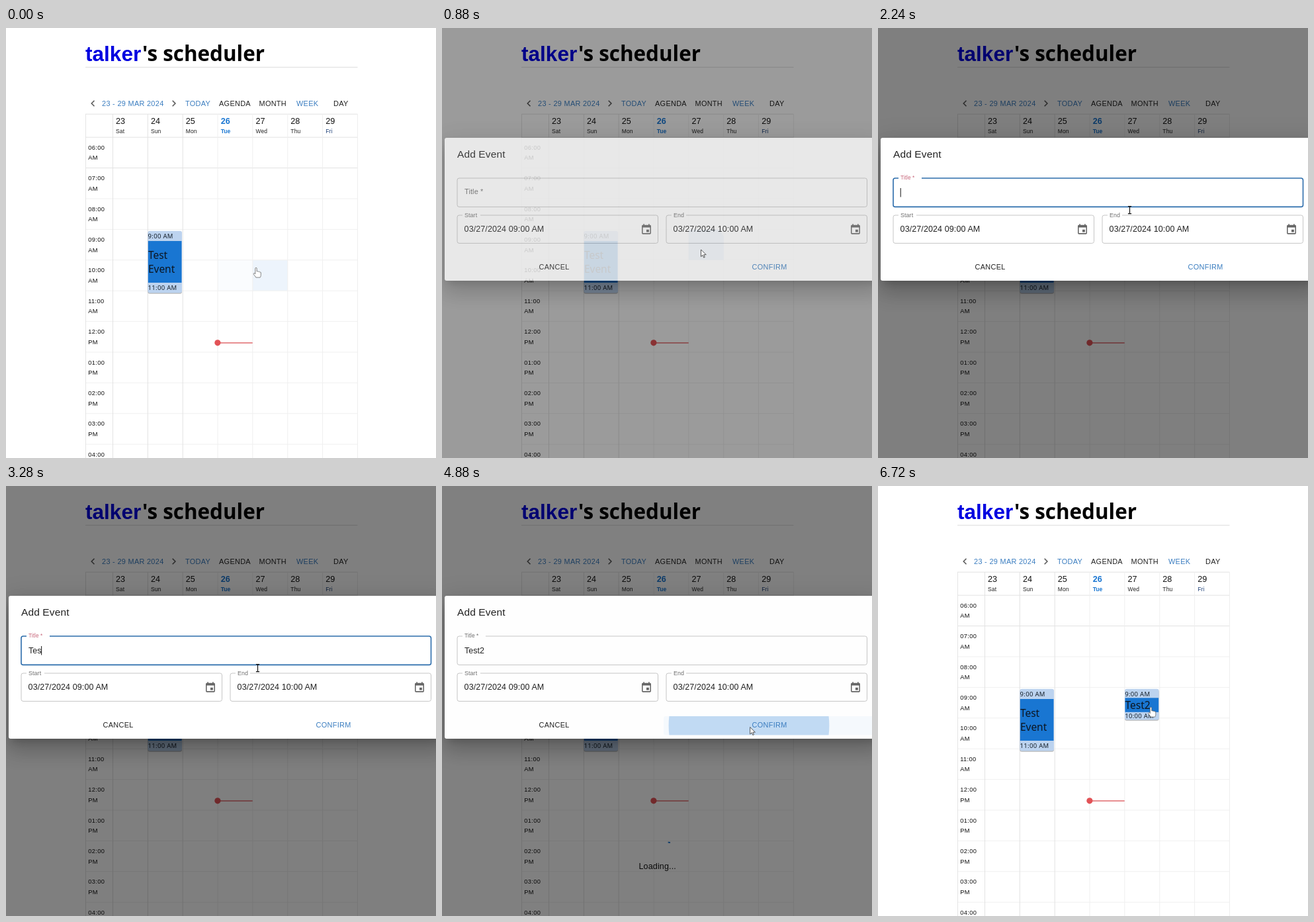
Write an HTML page that moves like this. It is 650x650 px and loops after 6800 ms.

```html
<!DOCTYPE html>
<html lang="en">
<head>
<meta charset="utf-8">
<title>Scheduler</title>
<style>
html, body { margin: 0; width: 100%; height: 100%; overflow: hidden; background: #fff; }
#stage { position: relative; width: 650px; height: 650px; overflow: hidden; }
#stage > *, #dialog > svg { position: absolute; left: 0; top: 0; }
svg { display: block; width: 650px; height: 650px; }
text { font-family: "Liberation Sans", Arial, sans-serif; white-space: pre; }
.noto { font-family: "Noto Sans", "Open Sans", sans-serif; }
#shade { width: 650px; height: 650px; background: rgba(0, 0, 0, .5); }
#dialog { width: 650px; height: 650px; }
#paper {
  position: absolute; left: 4px; top: 166px; width: 660px; height: 216px;
  border-radius: 3px; background: #fff;
  box-shadow: 0 8.5px 11.6px -5.4px rgba(0, 0, 0, .2),
    0 18.6px 29.5px 2.3px rgba(0, 0, 0, .14), 0 7px 35.7px 6.2px rgba(0, 0, 0, .12);
}
</style>
</head>
<body>
<div id="stage">
  <svg id="calendar"></svg>
  <div id="shade"></div>
  <div id="dialog"><div id="paper"></div><svg id="form"></svg></div>
  <svg id="pointer"></svg>
</div>
<script>
const LOOP = 6800, STEP = 80;
const BLUE = '#1976d2', LINK = '#3a7dc0', INK = '#222';
const $ = id => document.getElementById(id);

function add(parent, tag, attrs, content) {
  const el = document.createElementNS('http://www.w3.org/2000/svg', tag);
  set(el, attrs);
  if (content) el.textContent = content;
  parent.appendChild(el);
  return el;
}
function set(el, attrs) {
  for (const k in attrs) el.setAttribute(k, attrs[k]);
}
function label(parent, x, y, size, str, fill = INK, more = {}) {
  return add(parent, 'text', { x, y, 'font-size': size, fill, ...more }, str);
}
const box = (parent, x, y, width, height, fill, more = {}) =>
  add(parent, 'rect', { x, y, width, height, fill, ...more });
const line = (parent, d, stroke, more = {}) =>
  add(parent, 'path', { d, stroke, fill: 'none', ...more });
const show = (el, on) => set(el, { visibility: on ? 'visible' : 'hidden' });
const spaced = n => ({ 'letter-spacing': n });

const clamp = v => Math.min(1, Math.max(0, v));
const mix = (a, b, p) => a + (b - a) * p;
// cubic-bezier(.4, 0, .2, 1)
function ease(x) {
  x = clamp(x);
  let lo = 0, hi = 1;
  for (let i = 0; i < 24; i++) {
    const m = (lo + hi) / 2, n = 1 - m;
    if (1.2 * n * n * m + .6 * n * m * m + m ** 3 < x) lo = m; else hi = m;
  }
  return 3 * (1 - lo) * lo * lo + lo ** 3;
}
const ramp = (t, start, length) => ease((t - start) / length);

// Calendar
const cal = $('calendar');
const colX = i => 161.5 + i * 52.85;
const rowY = i => 165.2 + i * 46.4;

label(cal, 120, 50, 31.6, 'talker', '#0000e0', { 'font-weight': 700 });
label(cal, 206, 50, 31.4, "'s scheduler", '#000', { class: 'noto', 'font-weight': 700 });
line(cal, 'M120 59.3H531.5', '#dcdcdc');
for (const d of ['M133.5 109.8l-4.2 4.2 4.2 4.2', 'M251.7 109.8l4.2 4.2-4.2 4.2'])
  line(cal, d, '#5a5a5a', { 'stroke-width': 1.6 });
[[145, '23 - 29 MAR 2024', LINK], [271, 'TODAY', LINK], [322, 'AGENDA', INK],
 [382.5, 'MONTH', INK], [439, 'WEEK', LINK], [495, 'DAY', INK]]
  .forEach(([x, s, c]) => label(cal, x, 118, 10.9, s, c, spaced(.32)));

const hoverLayer = add(cal, 'g', {});
for (let r = 0; r <= 10; r++)
  line(cal, `M120 ${rowY(r)}H531.5`, r < 2 ? '#e2e2e2' : '#f0f0f0');
line(cal, 'M120 130.2H531.5', '#e2e2e2');
line(cal, 'M120.5 130V650', '#e4e4e4');
for (let c = 0; c <= 7; c++)
  line(cal, `M${colX(c)} 130V650`, c < 3 ? '#e2e2e2' : '#efefef');
['Sat', 'Sun', 'Mon', 'Tue', 'Wed', 'Thu', 'Fri'].forEach((day, i) => {
  const x = colX(i) + 4.6, today = i === 3;
  const bold = { 'font-weight': today ? 700 : 400 };
  label(cal, x, 145, 12.6, 23 + i, today ? BLUE : '#111', bold);
  label(cal, x, 159, 8.5, day, today ? BLUE : i === 6 ? '#1c3f77' : '#222', { ...bold, ...spaced(.1) });
});
for (let r = 0; r <= 10; r++) {
  const h = 6 + r, y = rowY(r) + 18.6;
  const hour = String(h > 12 ? h - 12 : h).padStart(2, '0');
  label(cal, 124.3, y, 9.3, hour + ':00', '#111', spaced(.31));
  label(cal, 124.3, y + 15.6, 9.3, h < 12 ? 'AM' : 'PM', '#111', spaced(.31));
}
line(cal, 'M320 475.9H372.7', '#e0686c', { 'stroke-width': 1.5 });
add(cal, 'circle', { cx: 319.9, cy: 475.8, r: 4.6, fill: '#e25256' });

function eventCard(x, bottom, head, foot, lines, start, end) {
  const g = add(cal, 'g', {}), top = 306.7, w = 51.6;
  box(g, x, top + 1.2, w, bottom - top, '#000', { rx: 3, opacity: .28 });
  box(g, x, top, w, bottom - top, '#bcd3ef', { rx: 3 });
  box(g, x + .5, head, w - 1, foot - head, BLUE);
  const small = { class: 'noto', ...spaced(.3) };
  label(g, x + .2, 317.6, 9.5, start, '#15202b', small);
  lines.forEach(([s, y]) => label(g, x + .5, y, 15.5, s, '#0c1622', { class: 'noto' }));
  label(g, x + .2, (foot + bottom) / 2 + 3.6, 9.5, end, '#15202b', small);
  return g;
}
eventCard(214.4, 400.6, 322, 385, [['Test', 349.3], ['Event', 370.2]], '9:00 AM', '11:00 AM');
const added = eventCard(373, 353.6, 320.3, 341.8, [['Test2', 337]], '9:00 AM', '10:00 AM');

// Column, row, enter time, leave time
const hovers = [[3, 4, -1000, -130], [4, 4, -130, 320], [4, 3, 320, 780], [5, 4, 5040, 6200]]
  .map(([c, r, from, to]) => ({
    from, to, el: box(hoverLayer, colX(c), rowY(r), 52.85, 46.4, BLUE)
  }));

function clip(parent, id, x, y, width, height) {
  box(add(parent, 'clipPath', { id }), x, y, width, height, '#000');
  return `url(#${id})`;
}
function ripple(parent, cx, cy, clipPath, size, start) {
  const g = add(parent, 'g', { 'clip-path': clipPath });
  return { el: add(g, 'circle', { cx, cy, fill: BLUE }), size, start };
}
function drawRipple(rp, t, release) {
  const p = ramp(t, rp.start, 550);
  set(rp.el, {
    r: rp.size * p,
    opacity: t < rp.start ? 0 : mix(.1, .3, p) * (1 - ramp(t, release, 550))
  });
}
const cellRipple = ripple(cal, 392, 335, clip(cal, 'cell', colX(4), rowY(3), 52.85, 46.4), 49, 590);

const loading = add(cal, 'g', {});
label(loading, 297.5, 579, 12.5, 'Loading...', '#111', spaced(.15));
const spinner = add(loading, 'circle', {
  cx: 325, cy: 537, r: 18.4, fill: 'none', stroke: BLUE, 'stroke-width': 3.3
});

// Dialog
const form = $('form');
label(form, 23, 195.5, 15.5, 'Add Event', INK, spaced(.12));
const field = (x, y, w, h) => box(form, x, y, w, h, 'none', { rx: 3, stroke: '#c6c6c6' });
const titleField = field(23, 227, 619.5, 43.4);
const notch = box(form, 31, 224, 35, 6, '#fff');
const titleLabel = label(form, 34, 251, 11, 'Title *', '#707070', spaced(.1));
const typed = label(form, 34, 253, 12.5, '', INK);
const caret = line(form, '', '#111');

const icon = 'M17 12h-5v5h5v-5zM16 1v2H8V1H6v2H5c-1.1 0-2 .9-2 2v14c0 1.1.9 2 2 2h14' +
  'c1.1 0 2-.9 2-2V5c0-1.1-.9-2-2-2h-1V1h-2zm3 18H5V8h14v11z';
[[23, 'Start', 27, '03/27/2024 09:00 AM'], [339, 'End', 22, '03/27/2024 10:00 AM']]
  .forEach(([x, name, gap, value]) => {
    field(x, 283, 303.5, 42.4);
    box(form, x + 8, 281, gap, 5, '#fff');
    label(form, x + 11, 285.5, 8.9, name, '#707070', spaced(.1));
    label(form, x + 10.6, 308.4, 12.5, value, INK, spaced(.1));
    add(form, 'path', {
      d: icon, fill: '#666', transform: `translate(${x + 276.7} 295.4) scale(.775)`
    });
  });
const confirmHover = box(form, 335, 348, 330, 28.4, BLUE, { rx: 3 });
const confirmRipple = ripple(form, 464, 362, clip(form, 'confirm', 335, 348, 315, 28.4), 187, 4650);
label(form, 146.6, 365.2, 10.9, 'CANCEL', INK, spaced(.32));
label(form, 468.5, 365.2, 10.9, 'CONFIRM', LINK, spaced(.32));

// Pointer shapes, hot spot at 0,0
const shape = (d, stroke, width) => add($('pointer'), 'path', {
  d, stroke, fill: '#fff', 'stroke-width': width, 'stroke-linejoin': 'round'
});
const pointers = {
  hand: shape('M-1.2 8V.6a1.2 1.2 0 0 1 2.4 0V5q1.2-.8 2.2.3 1.3-.5 2.1.5 1.6-.2 1.8 1.2V10.5' +
    'q0 2-1.2 3.6H-.2q-1.2-2.2-3.4-4.6-.8-1.5.6-1.9 1.2.1 1.8 1.2z', '#666', .8),
  arrow: shape('M0 0V10.6L2.5 8.3 4.2 12.1 5.8 11.4 4.2 7.7H7.7z', '#444', .9),
  beam: shape('M-2.6-5.5H2.6M0-5.5V5.5M-2.6 5.5H2.6', '#111', 1.2)
};

// Time, x, y
const path = [[0, 378, 363], [80, 378, 363], [440, 391.5, 335], [1280, 391.5, 335],
  [1640, 380.5, 275.2], [3840, 380.5, 275.2], [4400, 465.7, 364.5], [4900, 465.7, 364.5],
  [5200, 469.5, 364.3], [5880, 469.5, 364.3], [6400, 412.5, 335], [LOOP, 412.5, 335]];
const looks = [[0, 'hand'], [780, 'arrow'], [1520, 'beam'], [4000, 'arrow'],
  [4400, 'hand'], [4860, 'arrow'], [5040, 'hand']];
const keys = [2960, 3120, 3280, 3440, 3680];
const FOCUS = 1840, BLUR = 4650, OPEN = 767, CLOSE = 4872, DONE = 5110;

function drawPointer(t) {
  const i = path.findIndex(p => p[0] > t);
  const [t0, x0, y0] = path[i - 1], [t1, x1, y1] = path[i];
  const p = ease((t - t0) / (t1 - t0));
  const look = looks.filter(l => l[0] <= t).pop()[1];
  for (const name in pointers) show(pointers[name], name === look);
  set(pointers[look], { transform: `translate(${mix(x0, x1, p)} ${mix(y0, y1, p)})` });
}

function drawTitle(t) {
  const p = ramp(t, FOCUS, 200), focused = t >= FOCUS && t < BLUR;
  const hovered = t >= 1560 && t < FOCUS;
  set(titleField, {
    stroke: focused ? '#2b6cab' : hovered ? '#555' : '#c6c6c6',
    'stroke-width': focused ? 1.6 : 1
  });
  set(notch, { width: 35 * p });
  set(titleLabel, {
    y: mix(251, 229, p), 'font-size': mix(11, 8.2, p), fill: focused ? '#c8687c' : '#707070'
  });
  const pressed = keys.filter(k => k <= t);
  typed.textContent = 'Test2'.slice(0, pressed.length);
  const x = 34.2 + (pressed.length ? typed.getComputedTextLength() : 0);
  set(caret, { d: `M${x} 242V255.5` });
  const since = t - (pressed.pop() || FOCUS);
  show(caret, focused && since % 1000 < 500);
}

function drawLoading(t) {
  show(loading, t >= CLOSE && t < DONE);
  const turn = clamp((t - CLOSE) / 1400), unit = 18.4 / 20.2, p = clamp(turn * 2);
  set(spinner, {
    'stroke-dasharray': `${mix(1, 100, p) * unit} 200`,
    'stroke-dashoffset': -15 * p * unit,
    transform: `rotate(${turn * 360} 325 537)`
  });
}

function draw(t) {
  for (const h of hovers)
    set(h.el, { opacity: .1 * ramp(t, h.from, 250) * (1 - ramp(t, h.to, 250)) });
  drawRipple(cellRipple, t, 820);
  drawRipple(confirmRipple, t, 4900);
  set(confirmHover, { opacity: .04 * ramp(t, 4400, 250) });
  show(added, t >= DONE);
  const fade = ramp(t, OPEN, 225) * (1 - ramp(t, CLOSE, 165));
  $('shade').style.opacity = $('dialog').style.opacity = fade;
  drawTitle(t);
  drawLoading(t);
  drawPointer(t);
}

const begin = performance.now();
function tick() {
  const t = (performance.now() - begin) % LOOP;
  draw(Math.floor(t / STEP) * STEP);
  requestAnimationFrame(tick);
}
tick();
</script>
</body>
</html>
```
